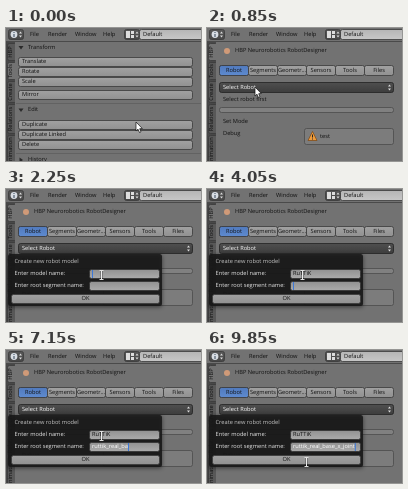
Write an HTML page with a canvas that moves like this. It is 195 by 133 pixels and loops after 9900 ms.

```html
<!DOCTYPE html>
<html>
<head>
<meta charset="utf-8">
<style>
html, body { margin: 0; width: 100%; height: 100%; overflow: hidden; background: #727272; }
canvas { display: block; }
</style>
</head>
<body>
<canvas id="stage" width="195" height="133"></canvas>
<script>
const LOOP = 9900;
const ctx = document.getElementById('stage').getContext('2d');
const FONT = '5.7px "Open Sans", "Noto Sans", sans-serif';
const PANEL = '#727272', DARK = '#111', BLUE = '#5680c2';

// moments when the interface changes
const SWITCH = 350, MENU = 1100, HOVER = 1300, DIALOG = 1650,
      EDIT_MODEL = 2250, LEAVE_MODEL = 3950, EDIT_SEGMENT = 4050;

// [time, x, y] stops of the pointer
const pointerPath = [
  [0, 130, 94], [300, 5, 24], [700, 5, 24], [850, 48, 59], [1250, 48, 59],
  [1350, 50, 71], [1800, 50, 71], [2100, 95, 86], [9200, 95, 86],
  [9500, 99, 108], [9600, 99, 108], [9650, 99, 110], [9750, 99, 110],
  [9850, 99, 112], [LOOP, 99, 112]
];

// [start, end, text] bursts of typing
const modelName = [[2650, 2750, 'Ru'], [3050, 3150, 'TT'], [3350, 3450, 'iK']];
const segmentName = [
  [4950, 5450, 'ruttik_'], [5800, 6250, 'real'], [6600, 6600, '_'],
  [7150, 7150, 'ba'], [7250, 7350, 'se'], [7800, 7800, '_'],
  [8000, 8150, 'x_'], [8450, 8850, 'joint']
];

function typed(bursts, t) {
  return bursts.map(([from, to, s]) => {
    if (t < from) return '';
    if (t >= to) return s;
    return s.slice(0, Math.floor((t - from) / (to - from) * (s.length - 1)) + 1);
  }).join('');
}

function pointerAt(t) {
  const i = pointerPath.findIndex(p => p[0] > t);
  const [t0, x0, y0] = pointerPath[i - 1], [t1, x1, y1] = pointerPath[i];
  const k = (t - t0) / (t1 - t0);
  return [x0 + (x1 - x0) * k, y0 + (y1 - y0) * k];
}

function rect(x, y, w, h, fill) {
  ctx.fillStyle = fill;
  ctx.fillRect(x, y, w, h);
}

function box(x, y, w, h, top, bottom = top, edge = '#3a3a3a', r = 2) {
  const g = ctx.createLinearGradient(0, y, 0, y + h);
  g.addColorStop(0, top);
  g.addColorStop(1, bottom);
  ctx.beginPath();
  ctx.roundRect(x + .5, y + .5, w - 1, h - 1, r);
  ctx.fillStyle = g;
  ctx.fill();
  ctx.strokeStyle = edge;
  ctx.lineWidth = .8;
  ctx.stroke();
}

// dark translucent sheet with a soft shadow
function popup(x, y, w, h) {
  ctx.save();
  ctx.shadowColor = 'rgba(0,0,0,.6)';
  ctx.shadowBlur = 4;
  ctx.shadowOffsetY = 1;
  ctx.beginPath();
  ctx.roundRect(x, y, w, h, 2.5);
  ctx.fillStyle = 'rgba(25,25,25,.88)';
  ctx.fill();
  ctx.restore();
}

function text(s, x, y, color = DARK, align = 'left') {
  ctx.fillStyle = color;
  ctx.textAlign = align;
  ctx.fillText(s, x, y);
}

function poly(points, fill, stroke) {
  ctx.beginPath();
  points.forEach(([x, y]) => ctx.lineTo(x, y));
  ctx.closePath();
  ctx.fillStyle = fill;
  ctx.fill();
  if (stroke) {
    ctx.strokeStyle = stroke;
    ctx.lineWidth = .7;
    ctx.stroke();
  }
}

function disc(x, y, r, fill) {
  ctx.beginPath();
  ctx.arc(x, y, r, 0, 7);
  ctx.fillStyle = fill;
  ctx.fill();
}

function upDown(x, y, color) {
  poly([[x - 1.5, y - 1], [x, y - 3], [x + 1.5, y - 1]], color);
  poly([[x - 1.5, y + 1], [x, y + 3], [x + 1.5, y + 1]], color);
}

function openMark(x, y) {
  poly([[x - 2.5, y - 1.5], [x + 2.5, y - 1.5], [x, y + 2]], '#2a2a2a');
}

function button(s, x, y, w, h) {
  box(x, y, w, h, '#a2a2a2', '#909090');
  text(s, x + w / 2, y + h / 2, DARK, 'center');
}

function header() {
  rect(0, 0, 195, 13, PANEL);
  rect(0, 13, 195, 1, '#4a4a4a');
  box(2, 1, 16, 11, '#585858', '#464646');
  disc(8, 6.5, 3.4, '#d8dde4');
  rect(7.5, 4, 1, 1, '#345');
  rect(7.5, 6, 1, 3, '#345');
  upDown(14.5, 6.5, '#ddd');
  [['File', 24], ['Render', 42], ['Window', 69], ['Help', 97]]
    .forEach(([s, x]) => text(s, x, 6.5));
  box(118, 1, 16, 11, '#585858', '#464646');
  rect(120, 3, 4, 7, '#ddd');
  rect(125, 3, 3, 3, '#ddd');
  rect(125, 7, 3, 3, '#ddd');
  upDown(131, 6.5, '#ddd');
  box(133, 1, 66, 11, '#b4b4b4', '#c8c8c8');
  text('Default', 137, 6.5);
}

function sideTabs(active) {
  rect(0, 14, 9, 119, '#484848');
  [['HBP', 15, 18], ['Tools', 34, 18], ['Create', 53, 22], ['Relations', 76, 30], ['Animation', 107, 32]]
    .forEach(([s, y, h]) => {
      box(1, y, 10, h, s === active ? PANEL : '#585858');
      ctx.save();
      ctx.translate(5, y + h / 2);
      ctx.rotate(-Math.PI / 2);
      text(s, 0, 0, DARK, 'center');
      ctx.restore();
    });
  rect(9, 14, 186, 119, PANEL);
}

function toolsPanel() {
  openMark(15, 19.5);
  text('Transform', 22, 19.5);
  openMark(15, 82);
  text('Edit', 22, 82);
  poly([[13.5, 129.5], [17, 132], [13.5, 134.5]], '#2a2a2a');
  text('History', 22, 132);
  rect(10, 75, 185, 1, '#626262');
  rect(10, 125, 185, 1, '#626262');
  [['Translate', 29], ['Rotate', 39], ['Scale', 49], ['Mirror', 62],
   ['Duplicate', 92], ['Duplicate Linked', 102], ['Delete', 112]]
    .forEach(([s, y]) => {
      button('', 12, y, 175, 10);
      text(s, 16, y + 5);
    });
}

function robotPanel() {
  disc(20, 23, 3, '#d09a78');
  text('HBP Neurorobotics RobotDesigner', 28, 23);
  ['Robot', 'Segments', 'Geometr...', 'Sensors', 'Tools', 'Files'].forEach((s, i) => {
    const x = 12 + i * 29;
    button(s, x, 37, 30, 11);
    if (i) return;
    box(x, 37, 30, 11, '#4f79bd', '#5f8bd0');
    text(s, x + 15, 42.5, DARK, 'center');
  });
  box(12, 54, 175, 11, '#505050', '#3c3c3c', '#222');
  text('Select Robot', 16, 59.5, '#fff');
  upDown(182.5, 59.5, '#ddd');
  text('Select robot first', 16, 71.5);
  box(12, 79, 175, 6, '#808080', '#808080', '#4c4c4c');
  text('Set Mode', 16, 93.5);
  text('Debug', 16, 105.5);
  box(97, 100, 90, 17, '#7c7c7c', '#7c7c7c', '#4c4c4c');
  poly([[105.5, 103.5], [110, 112.5], [101, 112.5]], '#ee9c3c', '#7c4510');
  rect(105, 106.5, 1, 3, '#222');
  rect(105, 110.5, 1, 1, '#222');
  text('test', 113, 108.5);
}

function robotMenu(t) {
  popup(10, 64.5, 178, 14.5);
  const hover = t >= HOVER;
  if (hover) box(10, 66, 178, 11, '#5f8bd0', '#4f79bd', BLUE, 0);
  const color = hover ? DARK : '#eee';
  text('New...', 27, 71.5, color);
  rect(27, 74, 4, .6, color);
}

function field(y, s, editing) {
  box(83, y, 71, 10, '#909090', '#acacac', '#333');
  text(s, 86, y + 5, editing ? '#fff' : DARK);
  if (editing) rect(86 + ctx.measureText(s).width, y + 1, 1, 8, '#3c78d8');
}

function dialog(t) {
  popup(2, 65, 154, 52);
  text('Create new robot model', 8.5, 72.5, '#c4c4c4');
  text('Enter model name:', 8.5, 84.5, '#e4e4e4');
  text('Enter root segment name:', 8.5, 97, '#e4e4e4');
  field(80, typed(modelName, t), t >= EDIT_MODEL && t < LEAVE_MODEL);
  field(92, typed(segmentName, t), t >= EDIT_SEGMENT);
  button('OK', 5, 105, 149, 10);
}

function pointer(t) {
  const [x, y] = pointerAt(t);
  if (t >= 2100) {
    rect(x - .5, y - 5, 2, 10, 'rgba(0,0,0,.5)');
    rect(x, y - 4.5, 1, 9, '#eee');
    rect(x - 1.5, y - 5, 4, 1, '#ddd');
    rect(x - 1.5, y + 4, 4, 1, '#ddd');
    return;
  }
  poly([[0, 0], [0, 9], [2, 7.2], [3.5, 10.5], [5, 9.8], [3.7, 6.7], [6.3, 6.5]]
    .map(([a, b]) => [x + a, y + b]), '#fff', DARK);
}

function draw(now) {
  // changes fall on a 50 ms grid
  const t = Math.floor(now % LOOP / 50 + 1e-6) * 50 % LOOP;
  ctx.font = FONT;
  ctx.textBaseline = 'middle';
  ctx.textRendering = 'geometricPrecision';
  sideTabs(t < SWITCH ? 'Tools' : 'HBP');
  header();
  if (t < SWITCH) toolsPanel();
  else robotPanel();
  if (t >= MENU && t < DIALOG) robotMenu(t);
  if (t >= DIALOG) dialog(t);
  pointer(t);
}

const start = performance.now();
function tick() {
  draw(performance.now() - start);
  requestAnimationFrame(tick);
}
tick();
</script>
</body>
</html>
```
